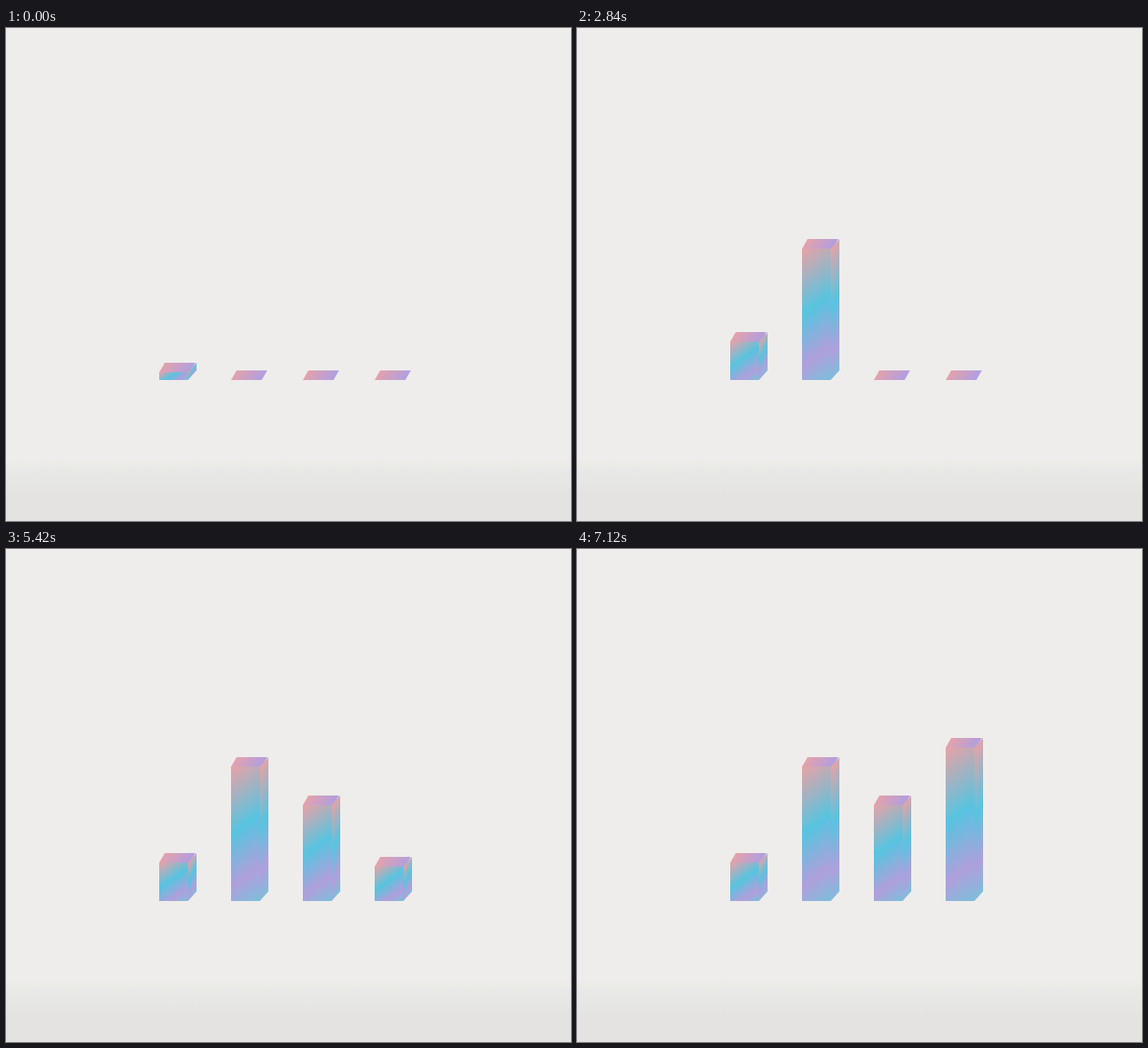
These frames come from a looping animation (590x514 px, 8.49 s). An HTML page:

```html
<!DOCTYPE html>
<html lang="en">
<head>
<meta charset="utf-8">
<title>Growing bars</title>
<style>
  html, body { margin: 0; width: 100%; height: 100%; overflow: hidden; background: #eeedeb; }
  svg { display: block; width: 590px; height: 514px; }
</style>
</head>
<body>
<svg id="stage" viewBox="0 0 590 514">
  <defs>
    <linearGradient id="floor" gradientUnits="userSpaceOnUse" x1="0" y1="448" x2="0" y2="488">
      <stop offset="0" stop-color="#eeedeb"/>
      <stop offset=".35" stop-color="#e8e9e6"/>
      <stop offset=".7" stop-color="#e6e6e4"/>
      <stop offset="1" stop-color="#e4e3e1"/>
    </linearGradient>
    <linearGradient id="shine">
      <stop offset="0" stop-color="#e8a2a6"/>
      <stop offset=".44" stop-color="#57c4e0"/>
      <stop offset=".78" stop-color="#b09fdb"/>
      <stop offset="1" stop-color="#7bbfdb"/>
    </linearGradient>
    <linearGradient id="lid" gradientUnits="userSpaceOnUse" x1="5" y1="-12" x2="28" y2="4">
      <stop offset="0" stop-color="#e8a2a6"/>
      <stop offset="1" stop-color="#b09fe0"/>
    </linearGradient>
  </defs>
  <rect width="590" height="514" fill="#eeedeb"/>
  <rect y="448" width="590" height="66" fill="url(#floor)"/>
</svg>
<script>
const LOOP = 8490, BASE = 367, WIDTH = 30, DEPTH = 9, RISE = 10;
const ANGLE = 145 * Math.PI / 180;

// Bursts of evenly spaced steps: first time, last time, count.
const bursts = [
  [0, 0, 1], [250, 490, 3], [740, 1220, 5], [1470, 1830, 4],
  [1980, 2100, 2], [2350, 3080, 7], [3330, 3690, 4], [3840, 4200, 4],
  [4450, 5050, 6], [5300, 6020, 7], [6270, 6870, 6], [7120, 7120, 1]
];
const stepTimes = bursts.flatMap(([first, last, count]) =>
  Array.from({ length: count }, (_, i) =>
    Math.floor((first + (last - first) * i / Math.max(1, count - 1)) / 10) * 10));

// Growth is linear per step: start step, pixels per step, full height.
const bars = [
  { x: 160, start: -1.333, rate: 6, max: 40 },
  { x: 235, start: 5.175, rate: 9.9, max: 140 },
  { x: 310, start: 19.33, rate: 6.85, max: 100 },
  { x: 385, start: 33.72, rate: 10.85, max: 160 }
];

const stage = document.getElementById('stage');
const defs = stage.querySelector('defs');

function add(parent, tag, attrs) {
  const node = document.createElementNS('http://www.w3.org/2000/svg', tag);
  set(node, attrs);
  return parent.appendChild(node);
}

function set(node, attrs) {
  for (const key in attrs) node.setAttribute(key, attrs[key]);
}

function makeFace(parent, id, width) {
  const gradient = add(defs, 'linearGradient',
    { id, href: '#shine', gradientUnits: 'userSpaceOnUse' });
  const rect = add(parent, 'rect', { width, fill: `url(#${id})` });
  return { gradient, rect, width };
}

// Corner-to-corner gradient line at a fixed angle, centred on the face.
function resizeFace({ gradient, rect, width }, height) {
  const sin = Math.sin(ANGLE), cos = Math.cos(ANGLE);
  const half = (width * Math.abs(sin) + height * Math.abs(cos)) / 2;
  const cx = width / 2, cy = height / 2;
  set(rect, { height });
  set(gradient, {
    x1: cx - sin * half, y1: cy + cos * half,
    x2: cx + sin * half, y2: cy - cos * half
  });
}

bars.forEach((bar, i) => {
  bar.group = add(stage, 'g', {});
  add(bar.group, 'path', { d: `M0 0H32L37.8 -${RISE}H5.8Z`, fill: 'url(#lid)' });
  bar.front = makeFace(bar.group, 'front' + i, WIDTH);
  const skewed = add(bar.group, 'g',
    { transform: `matrix(1 ${-RISE / DEPTH} 0 1 ${WIDTH} 0)` });
  bar.side = makeFace(skewed, 'side' + i, DEPTH);
});

function draw(time) {
  const step = stepTimes.filter(t => t <= time).length - 1;
  for (const bar of bars) {
    const grown = Math.round(bar.rate * (step - bar.start));
    const height = Math.max(0, Math.min(bar.max, grown));
    set(bar.group, { transform: `translate(${bar.x} ${BASE - height})` });
    resizeFace(bar.front, height);
    resizeFace(bar.side, height);
  }
}

const began = performance.now();
function tick() {
  draw((performance.now() - began) % LOOP);
  requestAnimationFrame(tick);
}
draw(0);
requestAnimationFrame(tick);
</script>
</body>
</html>
```
